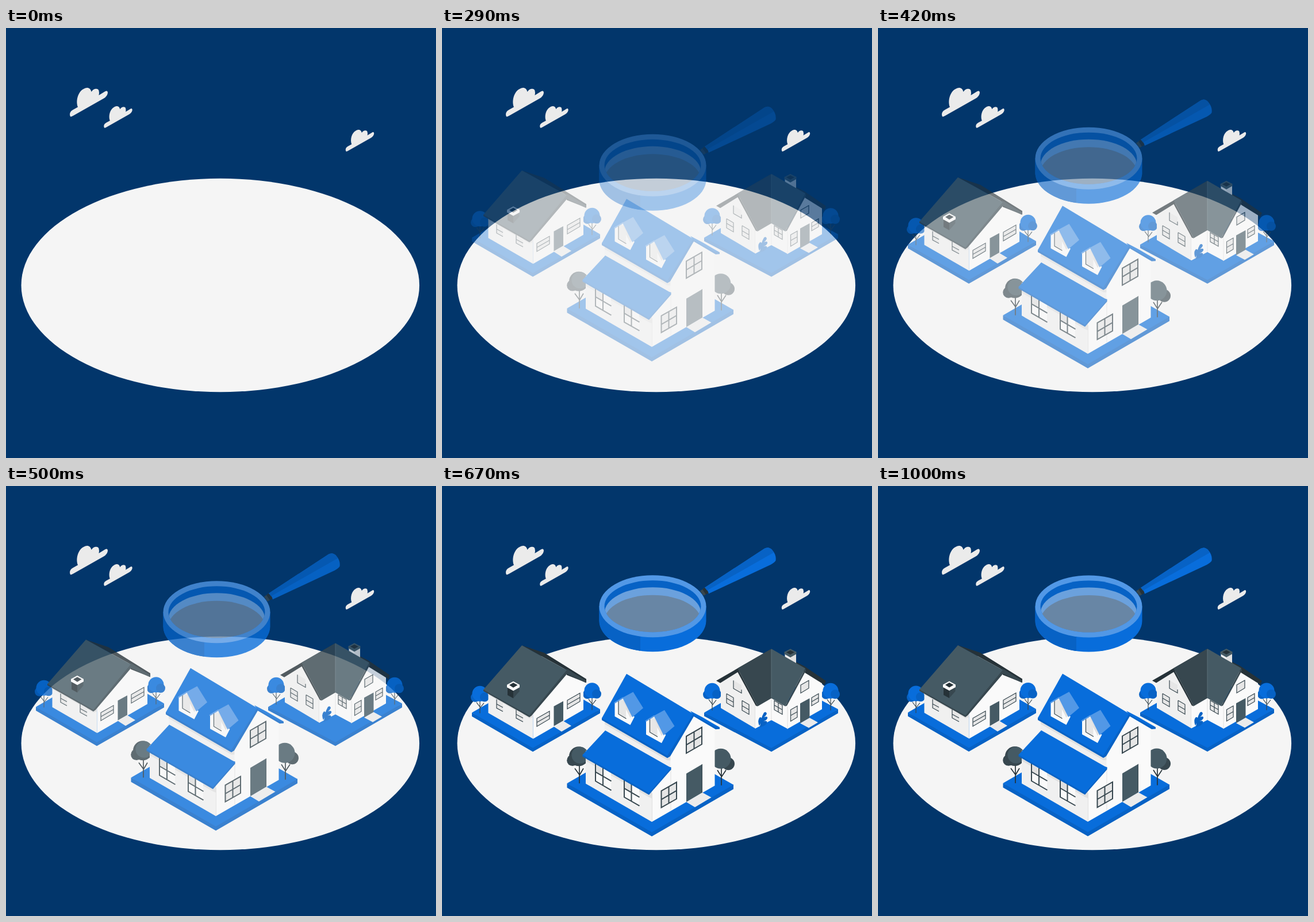
Animation of 748x748 px, one loop 1040 ms. Source, as an HTML page:

```html
<!DOCTYPE html>
<html lang="en">
<head>
<meta charset="utf-8">
<title>House search</title>
<style>
  html, body { margin: 0; width: 100%; height: 100%; overflow: hidden; background: #02366b; }
  svg { display: block; width: 100vw; height: 100vh; }
  .blue { fill: #086ddb; }
  .deep { fill: #0762c5; }
  .pale { fill: #5298e6; }
  .slate { fill: #455a64; }
  .dark { fill: #37474f; }
  .black { fill: #263238; }
  .lit { fill: #fafafa; }
  .side { fill: #f0f0f0; }
  .shade { fill: #e0e0e0; }
  .step { fill: #ebebeb; }
  .pane { fill: #e6e6e6; stroke: #37474f; stroke-width: 1.2; }
  .bars { fill: none; stroke: #37474f; stroke-width: 2; }
  .thin { fill: none; stroke: #37474f; stroke-width: 1.2; }
  .edge { fill: none; stroke: #e0e0e0; stroke-width: 1; }
</style>
</head>
<body>
<svg viewBox="0 0 748 748" xmlns="http://www.w3.org/2000/svg">
  <defs>
    <path id="cloud" fill="#ebebeb" d="M112 154C110 150 111 145 117 142L125 137.500C121 127 125 111 135 106C141 102 147 104 148.500 111C152 105 160 104 161.500 109Q162.500 113 161.500 117L172 110.500Q177 107.500 177 113Q176 119 170 122.500L117 152.500Q113 155 112 154Z"/>
    <g id="tree">
      <path class="thin" d="M0 8V34M0 23L-6 15M0 25L7 16"/>
      <circle class="deep" cx="-8" cy="6.500" r="8"/>
      <circle class="blue" r="13.500"/>
      <circle class="deep" cx="8" cy="6" r="8"/>
    </g>
    <g id="dormer">
      <path class="lit" d="M300.500 376L314.500 367.500L331 399L335 401L327.500 415.500L300.500 400.500Z"/>
      <path class="shade" d="M315 370L330 399L327.500 403L314 376Z"/>
      <path class="pane" style="stroke:none" d="M307 374L313 371L320 384V404L307 396Z"/>
      <path class="thin" d="M307 373V396.500L320.500 404.500"/>
      <path class="pale" d="M299 376.500L314.500 367L315.500 369L300 378.500Z"/>
      <path class="pale" d="M332.500 358L350 386L331 402L314 368Z"/>
    </g>
    <clipPath id="inner"><ellipse cx="366.500" cy="209.500" rx="84" ry="45"/></clipPath>
  </defs>

  <rect width="748" height="748" fill="#02366b"/>
  <ellipse cx="372.800" cy="447.500" rx="346.300" ry="185.700" fill="#f5f5f5"/>
  <use href="#cloud"/>
  <use href="#cloud" transform="translate(87 58) scale(.75)"/>
  <use href="#cloud" transform="translate(507.500 99) scale(.75)"/>

  <g id="houses" opacity="0">
    <!-- left house -->
    <g>
      <path class="deep" d="M52 394V400.500L158 462L275 395V388L158 448Z"/>
      <path class="blue" d="M52 394L169 326.500L275 388L158 455.500Z"/>
      <use href="#tree" x="66" y="361"/>
      <use href="#tree" x="261" y="355.500"/>
      <path class="side" d="M80.500 350V394.500L158.500 439.500V384Z"/>
      <path class="shade" d="M80.500 357L152 399L158.500 393V402L152 404L80.500 363Z"/>
      <path class="lit" d="M158.500 439.500L246 389V338L217 320L158.500 390Z"/>
      <path class="black" d="M139 277L178 290L251 335.500V342L217 328.500V320Z"/>
      <path class="dark" d="M213 318L219 319L250 338V342L218 327Z"/>
      <path class="dark" d="M72 354V356.500L152 402L156 399L218 326V320Z"/>
      <path class="slate" d="M139 277L217 320L152 399L72 354Z"/>
      <path class="black" d="M114 347L124 353V369L114 363.500Z"/>
      <path class="dark" d="M124 353L134.500 347V357L124 369Z"/>
      <path class="lit" d="M113 345.500L124 339.500L135 345.500V350L124 356L113 350Z"/>
      <path class="black" d="M117 346L124 342L131.500 346L124 350.500Z"/>
      <path class="pane" style="stroke:none" d="M95 371L106 377V392L95 386ZM129 389L141 396V410L129 403.500Z"/>
      <path class="thin" d="M95 371V386L106 392M95 379L106 385M129 389V403.500L141 410M129 397L141 403.500"/>
      <path class="pane" d="M165 404L187 391.500V405L165 418ZM165 411L187 398.500M218 372.500L240 360V374.500L218 387.500ZM218 380L240 367.500"/>
      <path class="slate" d="M194.500 383L211 374V408L194.500 417.500Z"/>
      <path class="step" d="M194 418L211 408.500L225 417L208 427Z"/>
    </g>

    <!-- right house -->
    <g>
      <path class="deep" d="M456 394V400L573 462L689 395V388L573 448Z"/>
      <path class="blue" d="M456 394L573 326.500L689 388L573 455.500Z"/>
      <use href="#tree" x="470" y="356"/>
      <use href="#tree" x="676" y="356"/>
      <path class="side" d="M485 338L516 317L545 366L553 374V417L545 421.500L485 386Z"/>
      <path class="lit" d="M545 372L573 358L601 376V422L573 407L545 421.500Z"/>
      <path class="edge" d="M544.500 378V421M573 368V407"/>
      <path class="lit" d="M600.500 422.500L661 388V341L632 319L600.500 378Z"/>
      <path class="edge" d="M601 383V422"/>
      <path class="black" d="M600 298L630 313L668 339L665 345.500L632 325Z"/>
      <path class="black" d="M573 283L477 338.500L484 342.500L517 322Z"/>
      <path class="side" d="M596.500 288L606 294L616 288V309L596.500 298Z"/>
      <path class="shade" d="M606 294L616 288V309L606 304Z"/>
      <path class="slate" d="M595.500 288.500L606 283L616.500 288.500V292L606 298L595.500 292Z"/>
      <path class="black" d="M599 289L606 285.500L613 289L606 293Z"/>
      <path class="black" d="M514 317L513 321L546 382L549 383Z"/>
      <path class="dark" d="M573 283L514 317L549 383L573 369Z"/>
      <path class="slate" d="M573 283L632 317L597 383L573 369Z"/>
      <path class="dark" d="M632 317L633 321L600 382L597 383Z"/>
      <path d="M573 284V368" stroke="#5c7079" stroke-width="1" fill="none"/>
      <path class="pane" style="stroke:none" d="M507 338L521 346V360L507 352ZM495 361L507 368V384L495 377ZM522 373L534 380V397L522 390Z"/>
      <path class="thin" d="M507 338V352L521 360V354M495 361V377L507 384V368L495 361M495 369L507 376M522 373V390L534 397V380L522 373M522 382L534 389"/>
      <path class="pane" d="M578 373L592 381V397L578 389ZM585 377V393M578 381L592 389"/>
      <path class="pane" d="M624 346L638 338V351.500L624 360ZM606.500 389L618 382.500V402L606.500 409ZM606.500 399L618 392.500M643 368L655 361V375L643 382ZM643 375L655 368"/>
      <path class="slate" d="M623 378L639.500 369V403L623 412.500Z"/>
      <path class="step" d="M623 412.500L639.500 403L654 411L638 420.500Z"/>
      <g class="deep">
        <path d="M553 420Q554 404 560 394Q564 391 565 396Q563 400 560 402Q567 399 566 404Q564 408 559 409Q567 407 565 412Q562 417 557 418Z"/>
        <path d="M552 417Q548 407 553 402Q557 401 556 408Z"/>
      </g>
    </g>

    <!-- front house -->
    <g>
      <path class="deep" d="M217.500 517V524.500L365 609.200L507 527V519L365 590Z"/>
      <path class="blue" d="M217.500 517L359 435L507 519.500L365 602Z"/>
      <g class="dark">
        <path class="thin" style="stroke:#263238;stroke-width:1.700" d="M239 484V517M239 502L231 491M239 503L246 491M486 486V520.500M486 505L479 494M486 506L494 494"/>
        <circle cx="227" cy="477" r="9.800"/>
        <circle cx="238" cy="470" r="17"/>
        <circle class="slate" cx="240" cy="468" r="14.500"/>
        <circle cx="498" cy="483" r="11"/>
        <circle class="slate" cx="485" cy="474" r="17.500"/>
      </g>
      <path class="side" d="M250 460V517.500L365 584V524Z"/>
      <path class="shade" d="M250 470L360 535L365 531V543L360 541L250 478Z"/>
      <path class="lit" d="M267 482L294 498V528L267 513ZM317 511L343 526V555L317 540Z"/>
      <path class="shade" d="M267 481L279 488V503L267 496ZM317 511L329 518V532L317 525Z"/>
      <path class="bars" d="M267 480.500V513L294.500 529M280 488V521M267 497L294.500 513M317 510V541L343.500 556M329.500 517V548M317 525.500L343.500 541"/>
      <path class="side" d="M283 405V428L398 494V464Z"/>
      <path class="shade" d="M283 408L393 471L398 468V477L392 477L283 414Z"/>
      <path class="lit" d="M365 584L474.500 521V418L437 396L397.500 466V490L365 529Z"/>
      <path class="edge" d="M365.500 534V583M398 490V564"/>
      <path class="deep" d="M437 395L483 419.500V422.500L476 423L437 400Z"/>
      <path class="blue" d="M432 391L453 402L482 419L474 418L437 398Z"/>
      <path class="deep" d="M278 403V407L392 473L397 470L438 400.500V396Z"/>
      <path class="blue" d="M321 326.500L437 396L392 469L278 403.500Z"/>
      <path class="deep" d="M244.500 467V470.500L360 537L398.500 493V489Z"/>
      <path class="blue" d="M284 425L398.500 490L360 533.500L244.500 467.500Z"/>
      <use href="#dormer"/>
      <use href="#dormer" x="54.500" y="31.500"/>
      <path class="pane" style="stroke-width:2" d="M381.500 530L408 515V544L381.500 559ZM394.500 523V551M381.500 545L408 529.500M425 435L452 419.500V449L425 464.500ZM438.500 427V457M425 450L452 434"/>
      <path class="slate" d="M425 500L453 483.500V533L425 549.500Z"/>
      <path class="dark" d="M452 484L453 483.500V533L452 533.500Z"/>
      <path class="step" d="M425 549.500L453 533L468.500 541.500L440 558.500Z"/>
    </g>
  </g>

  <g id="lens" opacity="0">
    <path class="dark" d="M449 183L458 176L464 186L455 191Z"/>
    <path class="black" d="M453 180L458 176L464 186L459 189Z"/>
    <path class="blue" d="M457 177L561 109Q568 105 574 111Q582 120 580.500 130Q579 133 572 137L464 187.500Q462 180 457 177Z"/>
    <path class="deep" d="M457 177L561 109Q568 105 574 111L577 116L461 182Q459 179 457 177Z"/>
    <path class="blue" d="M273.500 209.500V234.500A93 54 0 0 0 459.500 234.500V209.500Z"/>
    <path class="deep" d="M273.500 209.500V234.500A93 54 0 0 0 345 287V209.500Z"/>
    <ellipse class="pale" cx="366.500" cy="209.500" rx="93" ry="54"/>
    <g clip-path="url(#inner)">
      <rect class="deep" x="280" y="160" width="175" height="100"/>
      <ellipse cx="366.500" cy="221.500" rx="84" ry="45" fill="#6ba1dd"/>
      <ellipse cx="366.500" cy="235" rx="84" ry="45" fill="#6886a5"/>
    </g>
  </g>
</svg>
<script>
  const LOOP = 1040, FPS = 24, TRAVEL = 44.9;
  const houses = document.getElementById('houses');
  const lens = document.getElementById('lens');

  const bez = (a, b, s) => 3 * a * s * (1 - s) ** 2 + 3 * b * s * s * (1 - s) + s ** 3;

  // cubic-bezier(.36, -.01, .5, 1.38): eases in and overshoots
  function ease(x) {
    let lo = 0, hi = 1;
    for (let i = 0; i < 24; i++) {
      const mid = (lo + hi) / 2;
      if (bez(.36, .5, mid) < x) lo = mid; else hi = mid;
    }
    return bez(-.01, 1.38, hi);
  }

  function place(el, y, alpha) {
    el.setAttribute('transform', `translate(0 ${y.toFixed(3)})`);
    el.setAttribute('opacity', alpha);
  }

  function draw(ms) {
    // steps fall on whole hundredths of a second
    const step = Math.floor((Math.floor(ms / 10) * 10 + 4) * FPS / 1000);
    const p = ease(Math.min(1, (step + .5) / FPS));
    const alpha = step ? Math.max(0, Math.min(1, p)) : 0;
    place(houses, (p - 1) * TRAVEL, alpha);
    place(lens, (1 - p) * TRAVEL, alpha);
  }

  const start = performance.now();
  function tick() {
    draw((performance.now() - start) % LOOP);
    requestAnimationFrame(tick);
  }
  tick();
</script>
</body>
</html>
```
